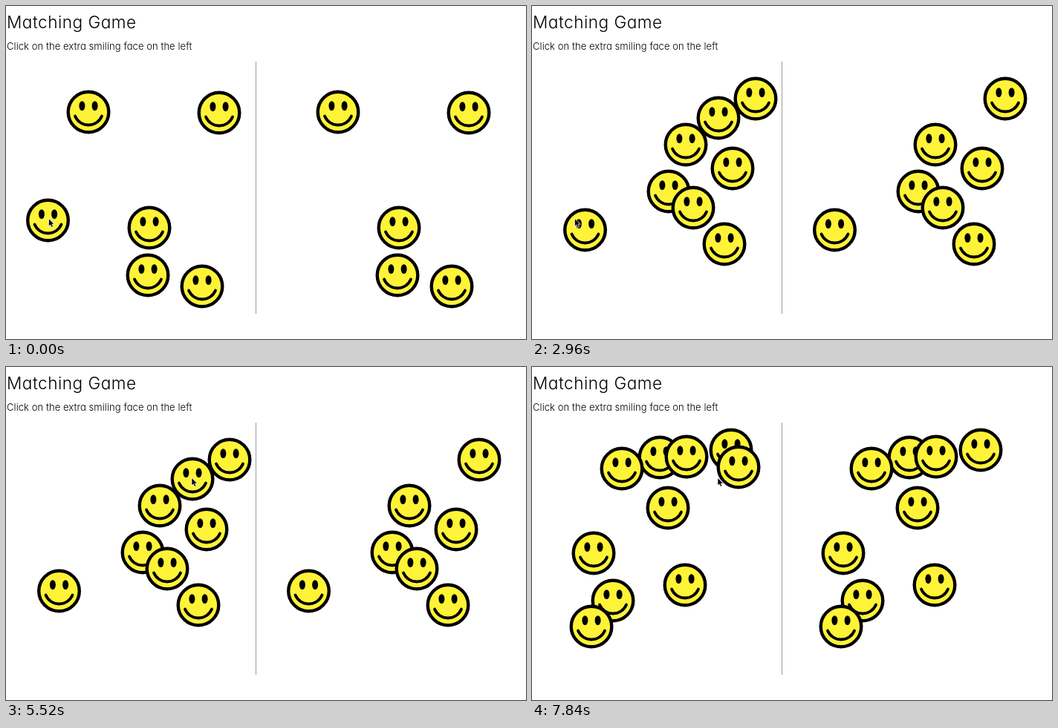
Animation of 700 by 449 pixels, one loop 8000 ms. Source, as an HTML page:

```html
<!DOCTYPE html>
<html lang="en">
<head>
<meta charset="utf-8">
<title>Matching Game</title>
<style>
  html, body { margin: 0; width: 100%; height: 100%; overflow: hidden; background: #fff; }
  svg { display: block; width: 700px; height: 449px; }
  text { font-family: Inter, Lato, sans-serif; font-weight: 300; font-feature-settings: "cv11"; }
  .title { font-size: 22.6px; letter-spacing: .5px; }
  .hint { font-size: 13px; letter-spacing: .07px; }

  .round, #ring { opacity: 0; animation: 8s step-end infinite; }
  #round1 { animation-name: first; }
  #round2 { animation-name: second; }
  #round3 { animation-name: third; }
  @keyframes first { 0% { opacity: 1 } 22%, 100% { opacity: 0 } }
  @keyframes second { 22% { opacity: 1 } 70%, 100% { opacity: 0 } }
  @keyframes third { 70%, 100% { opacity: 1 } }

  #cursor { animation: travel 8s cubic-bezier(.55, 0, .45, 1) infinite; }
  @keyframes travel {
    0%, 52% { transform: translate(57.8px, 287.2px) }
    63%, 100% { transform: translate(250.3px, 150px) }
  }

  /* Each click opens small for one step, then at full size. */
  #ring { animation-name: click; }
  @keyframes click {
    8%, 22%, 69% { opacity: 0 }
    5%, 18%, 66% { opacity: 1; transform: scale(.6) }
    6%, 19%, 67% { opacity: 1; transform: scale(1) }
  }
</style>
</head>
<body>
<svg viewBox="0 0 700 449">
  <defs>
    <g id="face">
      <circle r="27.3" fill="#fff338" stroke="#000" stroke-width="4.4"/>
      <ellipse cx="-8.6" cy="-8.4" rx="4" ry="6.4"/>
      <ellipse cx="8.6" cy="-8.4" rx="4" ry="6.4"/>
      <path d="M-18 5.5A19.5 19.5 0 0 0 18 5.5" fill="none" stroke="#000"
            stroke-width="3.8" stroke-linecap="round"/>
    </g>
  </defs>
  <text class="title" x="1" y="29.5">Matching Game</text>
  <text class="hint" x="1" y="59">Click on the extra smiling face on the left</text>
  <path d="M336.5 75V415" stroke="#9c9c9c"/>
  <g id="round1" class="round"></g>
  <g id="round2" class="round"></g>
  <g id="round3" class="round"></g>
  <g id="cursor">
    <g id="ring" fill="none">
      <circle r="14.4" stroke="#fff" stroke-width="1.4"/>
      <circle r="15.5" stroke="#333"/>
    </g>
    <path d="M0 0V9.2L2.1 7.3 3.7 10.9 5.1 10.3 3.6 6.8H6.5Z"
          stroke="#fff" stroke-width="1.5" paint-order="stroke"/>
  </g>
</svg>
<script>
  const PANEL = 336;
  // Face centres in paint order; the last of each round is the extra one.
  const rounds = [
    '111,143 287,144 193,299 191,363 264,378 56.5,289',
    '301,125 207,187 270,219 184,250 217,272 71.5,302 259,321 251,151',
    '172,122 121,137 208,121 268,112 183,190 83,251 109,315 80,350 206,294 278,135'
  ];
  const draw = ([x, y], dx = 0) => `<use href="#face" x="${x + dx}" y="${y}"/>`;

  rounds.forEach((round, i) => {
    const faces = round.split(' ').map(p => p.split(',').map(Number));
    const left = faces.map(p => draw(p));
    const right = faces.slice(0, -1).map(p => draw(p, PANEL));
    document.getElementById(`round${i + 1}`).innerHTML = [...left, ...right].join('');
  });
</script>
</body>
</html>
```
